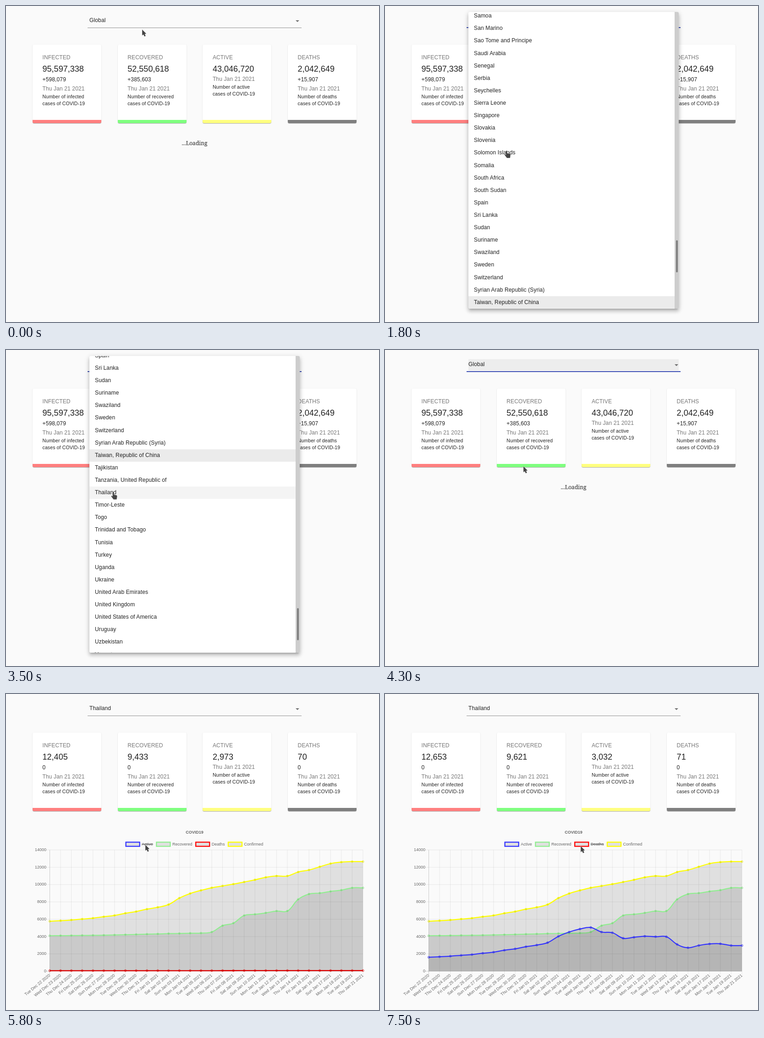
Animation of 814x688 px, one loop 8000 ms. Source, as an HTML page with a canvas:

```html
<!DOCTYPE html>
<html lang="en">
<head>
<meta charset="utf-8">
<title>Case dashboard</title>
<style>
html, body { margin: 0; width: 100%; height: 100%; overflow: hidden; background: #fafafa; }
#stage { position: absolute; left: 0; top: 0; width: 814px; height: 688px; overflow: hidden; background: #fafafa;
  font: 12.05px "Liberation Sans", Arial, sans-serif; color: rgba(0,0,0,.87); }
#stage div, #stage span, #stage canvas, #stage svg { position: absolute; }
span { white-space: nowrap; line-height: 20px; letter-spacing: .00938em; }
.grey { color: rgba(0,0,0,.54); }
.big { font-size: 18.07px; letter-spacing: 0; }
.small { font-size: 10.54px; letter-spacing: .01071em; }
.card { box-sizing: border-box; top: 84px; width: 150px; height: 171px; background: #fff; border-radius: 3px; border-bottom: 7.5px solid;
  box-shadow: 0 1.5px .75px -.75px rgba(0,0,0,.2), 0 .75px .75px rgba(0,0,0,.14), 0 .75px 2.3px rgba(0,0,0,.12); }
#selectFill { left: 182px; top: 20px; width: 459px; height: 25px; background: rgba(0,0,0,.05); }
#underline { left: 178px; width: 467px; }
#caret { left: 631.7px; top: 30.7px; border: solid transparent; border-width: 4px 4px 0; border-top-color: rgba(0,0,0,.54); }
#loading { left: 0; width: 823px; top: 289px; text-align: center; font-family: "Noto Serif", serif; letter-spacing: 0; }
#menu { left: 182px; top: 12.7px; width: 459px; height: 646px; background: #fff; border-radius: 3px; transform-origin: 0 30px;
  box-shadow: 0 3.8px 3.8px -2.3px rgba(0,0,0,.2), 0 6px 7.5px .75px rgba(0,0,0,.14), 0 2.3px 10.5px 1.5px rgba(0,0,0,.12); }
#view { inset: 0; overflow: hidden; border-radius: 3px; }
#list { left: 0; top: 5.5px; width: 450px; }
#list div { left: 0; width: 438px; padding-left: 12px; height: 27.11px; line-height: 27.11px; letter-spacing: .00938em; white-space: nowrap; }
#track { right: 0; top: 0; width: 9px; height: 100%; background: #cdcdcd; }
#thumb { left: 2.5px; width: 4.5px; height: 70px; border-radius: 2.5px; background: #7f7f7f; }
.cursor { left: 0; top: 0; overflow: visible; fill: #444; stroke: rgba(255,255,255,.55); stroke-width: .6; }
</style>
</head>
<body>
<div id="stage">
  <div id="selectFill"></div><div id="underline"></div><div id="caret"></div>
  <span id="loading">...Loading</span>
  <canvas id="chart" width="814" height="688"></canvas>
  <div id="menu"><div id="view"><div id="list"></div><div id="track"><div id="thumb"></div></div></div></div>
  <svg id="arrow" class="cursor" width="12" height="18"><path d="M0 0V13.2L3 11.3L5 15.6L8 14.2L6 10L9.4 9.4Z"/></svg>
  <svg id="hand" class="cursor" width="16" height="18"><path d="M3.6 1.6a1.5 1.5 0 0 1 3 0V5.8L12 7Q14 7.6 13.6 10L12.6 16.4H5.6L.6 9.8Q0 7.8 2 8.3L3.6 9.6Z"/></svg>
</div>
<script>
const $ = id => document.getElementById(id);
const stage = $('stage'), ctx = $('chart').getContext('2d');
const LOOP = 8000, ROW = 27.11, FIRST_ROW_Y = 31.7;

// Moments at which the picture updates: [from, to] in 100 ms steps, or single times.
const ticks = [[0, 300], [700, 2400], [2800, 2900], 3100, 3300, 3500, 3700, 3800, 4000, 4300, 4600, 5000,
  5300, 5500, 5800, 6000, 6200, 6400, 6500, 6700, 6900, 7300, 7500].flatMap(r =>
  Array.isArray(r) ? Array.from({ length: (r[1] - r[0]) / 100 + 1 }, (_, i) => r[0] + i * 100) : r);

const last = (table, t) => table.filter(row => row[0] <= t).pop();
function lerp(table, t, col = 1) {
  const a = last(table, t), b = table.find(row => row[0] > t);
  return b ? a[col] + (b[col] - a[col]) * (t - a[0]) / (b[0] - a[0]) : a[col];
}
const between = (t, a, b) => t >= a && t < b;

const cursorPath = [[0, 297, 51], [300, 290, 40], [700, 288, 40], [800, 268, 68], [900, 236, 118], [1000, 209, 152],
  [1300, 228, 205], [1700, 258, 310], [2200, 270, 333], [2400, 264, 350], [2900, 254, 365], [3100, 238, 329],
  [3300, 227, 311], [3500, 229, 309], [3800, 230, 308], [4000, 262, 290], [4300, 302, 253], [4600, 304, 262],
  [5000, 306, 300], [5500, 304, 326], [5800, 304, 328], [6000, 303, 328], [6200, 304, 324], [6500, 308, 326],
  [6700, 345, 330], [6900, 390, 326], [7300, 427, 331]];
const menuFade = [[0, 0], [600, 0], [700, .03], [800, .5], [900, .83], [1000, .94], [1100, 1], [3600, 1], [3700, .93],
  [3800, .45], [4000, .06], [4300, 0]];
const menuGrow = [[0, 0], [700, .12], [800, .76], [900, 1], [3800, 1], [4000, .22]];
const taiwanY = [[0, 645], [1900, 645], [2000, 575], [2100, 470], [2200, 371.5], [2300, 340], [2400, 330],
  [2700, 330], [2800, 265], [2900, 229.5]];
const hovers = [[0, '', 0], [800, 'Afghanistan', .04], [900, 'Algeria', .04], [1000, 'Andorra', .035], [1100, 'Angola', .04],
  [1300, '', 0], [2200, 'Suriname', .015], [2300, '', 0], [2900, 'Thailand', .043]];

function label(x, y, text, cls = '') {
  const el = document.createElement('span');
  el.className = cls;
  el.textContent = text;
  el.style.cssText = `left:${x}px;top:${y - 10}px`;
  stage.insertBefore(el, $('menu'));
  return el;
}

const selected = label(182, 30.7, 'Global');
const cards = [
  ['infected', '#ff7f7f', 95597338, '+598,079', 12653],
  ['recovered', '#7fff7f', 52550618, '+385,603', 9621],
  ['active', '#ffff7f', 43046720, '', 3032],
  ['deaths', '#7f7f7f', 2042649, '+15,907', 71]
].map(([name, color, world, change, local], i) => {
  const box = document.createElement('div'), left = 58 + i * 185.7, x = left + 21.5;
  box.className = 'card';
  box.style.left = left + 'px';
  box.style.borderBottomColor = color;
  stage.insertBefore(box, $('menu'));
  label(x, 112, name.toUpperCase(), 'grey');
  const total = label(x, 137.3, '', 'big');
  const delta = change && label(x, 160, '');
  const y = change ? 179.5 : 158.5;
  label(x, y, 'Thu Jan 21 2021', 'grey');
  label(x, y + 17, 'Number of ' + name, 'small');
  label(x, y + 32, 'cases of COVID-19', 'small');
  return { total, delta, world, change, local };
});

const places = `Global|Afghanistan|Albania|Algeria|Andorra|Angola|Antigua and Barbuda|Argentina|Armenia|Australia|Austria|Azerbaijan|Bahamas|Bahrain|Bangladesh|Barbados|Belarus|Belgium|Belize|Benin|Bhutan|Bolivia|Bosnia and Herzegovina|Botswana|Brazil|Brunei Darussalam|Bulgaria|Burkina Faso|Burundi|Cambodia|Cameroon|Canada|Cape Verde|Central African Republic|Chad|Chile|China|Colombia|Comoros|Congo (Brazzaville)|Congo (Kinshasa)|Costa Rica|Croatia|Cuba|Cyprus|Czech Republic|Côte d'Ivoire|Denmark|Djibouti|Dominica|Dominican Republic|Ecuador|Egypt|El Salvador|Equatorial Guinea|Eritrea|Estonia|Ethiopia|Fiji|Finland|France|Gabon|Gambia|Georgia|Germany|Ghana|Greece|Grenada|Guatemala|Guinea|Guinea-Bissau|Guyana|Haiti|Holy See (Vatican City State)|Honduras|Hungary|Iceland|India|Indonesia|Iran, Islamic Republic of|Iraq|Ireland|Israel|Italy|Jamaica|Japan|Jordan|Kazakhstan|Kenya|Korea (South)|Kuwait|Kyrgyzstan|Lao PDR|Latvia|Lebanon|Lesotho|Liberia|Libya|Liechtenstein|Lithuania|Luxembourg|Macedonia, Republic of|Madagascar|Malawi|Malaysia|Maldives|Mali|Malta|Marshall Islands|Mauritania|Mauritius|Mexico|Micronesia, Federated States of|Moldova|Monaco|Mongolia|Montenegro|Morocco|Mozambique|Myanmar|Namibia|Nepal|Netherlands|New Zealand|Nicaragua|Niger|Nigeria|Norway|Oman|Pakistan|Palestinian Territory|Panama|Papua New Guinea|Paraguay|Peru|Philippines|Poland|Portugal|Qatar|Republic of Kosovo|Romania|Russian Federation|Rwanda|Saint Kitts and Nevis|Saint Lucia|Saint Vincent and Grenadines|Samoa|San Marino|Sao Tome and Principe|Saudi Arabia|Senegal|Serbia|Seychelles|Sierra Leone|Singapore|Slovakia|Slovenia|Solomon Islands|Somalia|South Africa|South Sudan|Spain|Sri Lanka|Sudan|Suriname|Swaziland|Sweden|Switzerland|Syrian Arab Republic (Syria)|Taiwan, Republic of China|Tajikistan|Tanzania, United Republic of|Thailand|Timor-Leste|Togo|Trinidad and Tobago|Tunisia|Turkey|Uganda|Ukraine|United Arab Emirates|United Kingdom|United States of America|Uruguay|Uzbekistan|Vanuatu|Venezuela (Bolivarian Republic)|Viet Nam|Yemen|Zambia|Zimbabwe`.split('|');
const rows = places.map((name, i) => {
  const el = document.createElement('div');
  el.textContent = name;
  el.style.top = i * ROW + 'px';
  return $('list').appendChild(el);
});
const taiwan = places.findIndex(name => name.startsWith('Taiwan'));

// Chart
const L = 95.5, R = 779, T = 339.5, B = 603.5, FONT = 9.04, LINE = 2.26, DAYS = 30;
const confirmed = [5762, 5829, 5910, 6020, 6123, 6285, 6440, 6690, 6884, 7163, 7379, 7694, 8439, 8966, 9331, 9636, 9841,
  10053, 10298, 10547, 10834, 10991, 10991, 11450, 11680, 12054, 12423, 12594, 12653, 12653];
const recovered = [4095, 4104, 4115, 4130, 4141, 4152, 4180, 4210, 4240, 4273, 4299, 4337, 4352, 4382, 4397, 4521, 5255,
  5546, 6428, 6566, 6732, 6943, 6943, 8288, 8906, 9015, 9206, 9356, 9621, 9621];
const deaths = confirmed.map((_, i) => 60 + 11 * i / (DAYS - 1));
const active = confirmed.map((c, i) => c - recovered[i] - deaths[i]);
const series = [['Active', '#3333ff', active], ['Recovered', 'lightgreen', recovered], ['Deaths', 'red', deaths],
  ['Confirmed', 'yellow', confirmed]];
const dayX = i => L + (R - L) * i / (DAYS - 1);
const shade = 'rgba(0,0,0,.1)';

function stroke(x1, y1, x2, y2, color, width = .75) {
  ctx.strokeStyle = color;
  ctx.lineWidth = width;
  ctx.beginPath();
  ctx.moveTo(x1, y1);
  ctx.lineTo(x2, y2);
  ctx.stroke();
}

function write(text, x, y, align, weight = '') {
  ctx.font = `${weight} ${FONT}px "Liberation Sans", Arial, sans-serif`;
  ctx.fillStyle = '#666';
  ctx.textAlign = align;
  ctx.textBaseline = 'middle';
  ctx.fillText(text, x, y);
}

function drawAxes() {
  for (let i = 0; i < DAYS; i++) {
    const x = dayX(i);
    stroke(x, T, x, B + 7.5, i ? shade : 'rgba(0,0,0,.25)');
    ctx.save();
    ctx.translate(x, B + 8.5);
    ctx.rotate(-39 * Math.PI / 180);
    const skip = i === DAYS - 1 ? 1 : 0;
    write(new Date(2020, 11, 22 + i + skip).toDateString(), 0, 0, 'right');
    ctx.restore();
  }
  for (let v = 0; v <= 14000; v += 2000) {
    const y = B - (B - T) * v / 14000;
    stroke(L - 7.5, y, R, y, v ? shade : 'rgba(0,0,0,.25)');
    write(v, L - 7.5, y, 'right');
  }
}

function drawLegend(hidden) {
  write('COVID19', 411.5, 301.5, 'center', 'bold');
  let x = 261.6;
  for (const [name, color] of series) {
    ctx.fillStyle = shade;
    ctx.strokeStyle = color;
    ctx.lineWidth = LINE;
    ctx.fillRect(x, 322.6, 30.1, FONT);
    ctx.strokeRect(x, 322.6, 30.1, FONT);
    const textX = x + 30.1 + FONT / 2;
    write(name, textX, 327.1, 'left');
    const width = ctx.measureText(name).width;
    if (name === hidden) stroke(textX, 327.1, textX + width, 327.1, '#666', 1.5);
    x = textX + width + 7.53;
  }
}

// Smooth curve with tension .4, control points kept inside the plot.
function curve(points) {
  const clampY = y => Math.min(B, Math.max(T, y));
  const handles = points.map((p, i) => {
    const a = points[i - 1] || p, b = points[i + 1] || p;
    const before = Math.hypot(p.x - a.x, p.y - a.y), after = Math.hypot(b.x - p.x, b.y - p.y);
    const k = .4 / (before + after), dx = b.x - a.x, dy = b.y - a.y;
    return { inX: p.x - k * before * dx, inY: clampY(p.y - k * before * dy),
      outX: p.x + k * after * dx, outY: clampY(p.y + k * after * dy) };
  });
  const path = new Path2D();
  path.moveTo(points[0].x, points[0].y);
  for (let i = 1; i < points.length; i++) {
    const h = handles[i - 1], g = handles[i];
    path.bezierCurveTo(h.outX, h.outY, g.inX, g.inY, points[i].x, points[i].y);
  }
  return path;
}

function drawSeries([, color, values], rise) {
  const points = values.map((v, i) => ({ x: dayX(i), y: B - (B - T) * v / 14000 * rise }));
  const line = curve(points), area = new Path2D(line);
  area.lineTo(R, B);
  area.lineTo(L, B);
  ctx.fillStyle = shade;
  ctx.fill(area);
  ctx.strokeStyle = color;
  ctx.lineWidth = LINE;
  ctx.stroke(line);
  ctx.lineWidth = .75;
  for (const p of points) {
    ctx.beginPath();
    ctx.arc(p.x, p.y, LINE, 0, 7);
    ctx.fill();
    ctx.stroke();
  }
}

function drawChart(t) {
  ctx.clearRect(0, 0, 814, 688);
  if (t < 4600) return;
  const hidden = between(t, 5800, 6400) ? 'Active' : t >= 7500 ? 'Deaths' : '';
  const rise = 1 - (1 - Math.min(1, (t - 4500) / 1000)) ** 4;
  drawAxes();
  drawLegend(hidden);
  [...series].reverse().filter(s => s[0] !== hidden).forEach(s => drawSeries(s, rise));
}

function drawCards(t) {
  const p = Math.min(1, (t - 4365) / 2560), eased = (1 - 2 ** (-10 * p)) * 1024 / 1023;
  for (const c of cards) {
    const value = t < 4600 ? c.world : Math.round(c.local * eased);
    c.total.textContent = value.toLocaleString('en-US');
    if (c.delta) c.delta.textContent = t < 4600 ? c.change : '0';
  }
}

function drawSelect(t) {
  selected.textContent = t < 4600 ? 'Global' : 'Thailand';
  $('selectFill').hidden = !between(t, 700, 5500);
  $('selectFill').style.display = between(t, 700, 5500) ? '' : 'none';
  const focus = between(t, 700, 5800), hover = between(t, 100, 700);
  const line = $('underline').style;
  line.top = focus || hover ? '46px' : '47px';
  line.height = focus || hover ? '2px' : '1px';
  line.background = focus ? '#3f51b5' : hover ? 'rgba(0,0,0,.87)' : 'rgba(0,0,0,.42)';
}

function drawMenu(t) {
  const opacity = lerp(menuFade, t), grow = lerp(menuGrow, t), menu = $('menu').style;
  menu.display = opacity ? '' : 'none';
  menu.opacity = opacity;
  menu.transform = grow < 1 ? `scale(${.75 + .25 * grow}, ${.5625 + .4375 * grow})` : 'none';
  const jumped = t >= 1700;
  const scroll = jumped ? taiwan * ROW + FIRST_ROW_Y - lerp(taiwanY, t) : 0;
  $('list').style.transform = `translateY(${-scroll}px)`;
  $('thumb').style.top = 2.3 + scroll * .1248 + 'px';
  const [, hovered, alpha] = last(hovers, t), focused = jumped ? taiwan : 0;
  rows.forEach((row, i) => {
    const a = i === focused ? .08 : places[i] === hovered ? alpha : 0;
    row.style.background = a ? `rgba(0,0,0,${a})` : 'none';
  });
}

function drawCursor(t) {
  const pointing = between(t, 200, 4000);
  const move = `translate(${lerp(cursorPath, t)}px, ${lerp(cursorPath, t, 2)}px)`;
  $('hand').style.transform = $('arrow').style.transform = move;
  $('hand').style.display = pointing ? '' : 'none';
  $('arrow').style.display = pointing ? 'none' : '';
}

let start, shown;
function frame(now) {
  start ??= now;
  const time = (now - start) % LOOP, t = ticks.filter(k => k <= time).pop() ?? 0;
  if (t !== shown) {
    shown = t;
    $('loading').style.display = t < 4600 ? '' : 'none';
    [drawSelect, drawCards, drawChart, drawMenu, drawCursor].forEach(draw => draw(t));
  }
  requestAnimationFrame(frame);
}
requestAnimationFrame(frame);
</script>
</body>
</html>
```
